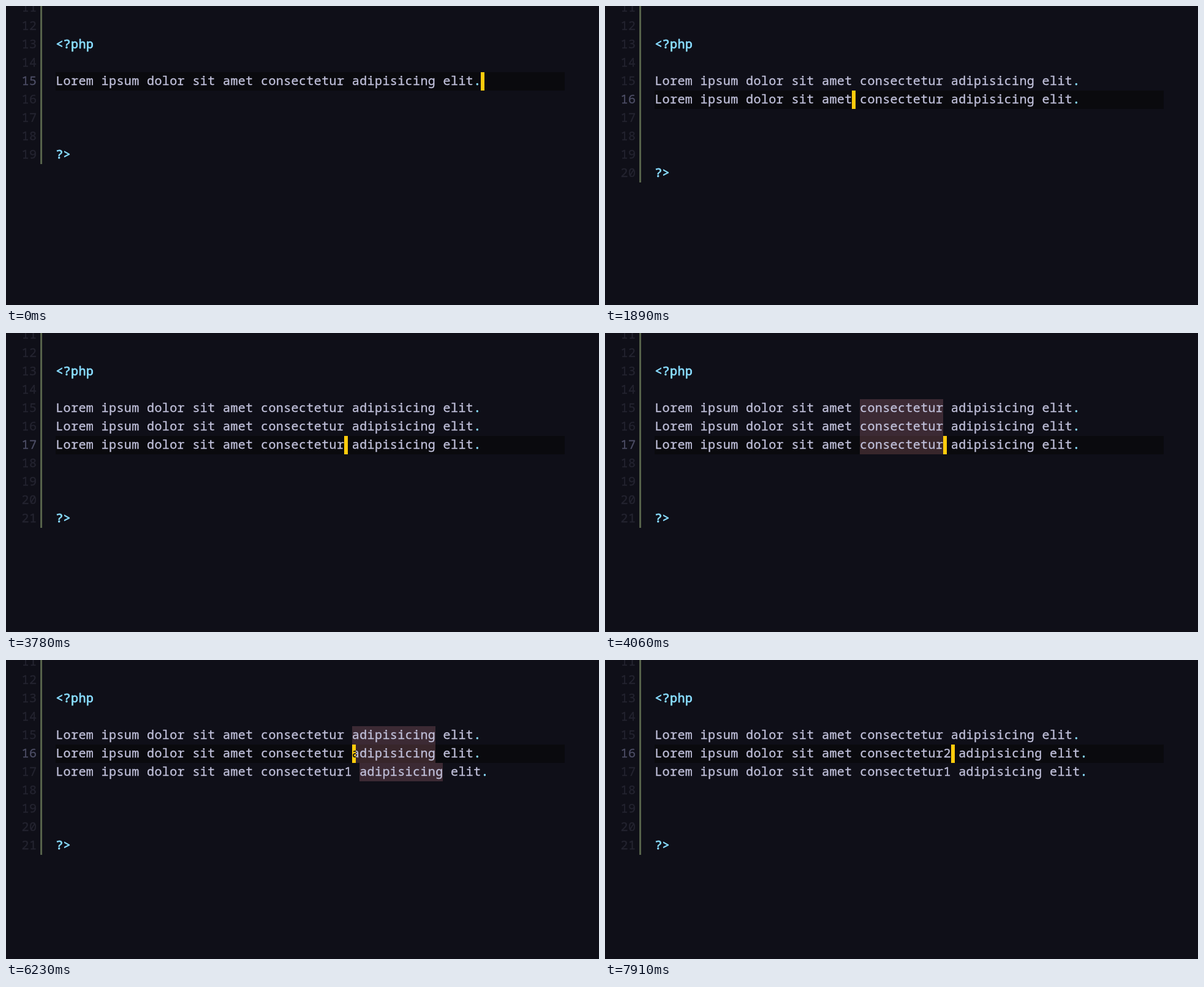
An HTML page with a canvas for the animation above (8000 ms loop, 968x488 px).

```html
<!DOCTYPE html>
<html lang="en">
<head>
<meta charset="utf-8">
<title>Editor word highlight</title>
<style>
  html, body { margin: 0; width: 100%; height: 100%; overflow: hidden; background: #0f0f18; }
  canvas { display: block; }
</style>
</head>
<body>
<canvas id="stage" width="968" height="488"></canvas>
<script>
const ctx = document.getElementById('stage').getContext('2d');
const LOOP = 8000, LEFT = 81, STEP = 12.4, ROW = 30, FIRST = 15;
const COLORS = {
  back: '#0f0f18', line: '#0a0a0e', text: '#c0c0da', tag: '#89ddff',
  number: '#242430', active: '#4d4e66', bar: '#56624a',
  match: 'rgba(255, 160, 170, .19)', cursor: '#ffcb0c'
};

// Each state: start time, cursor line, cursor column, highlighted word
const states = [
  [0, 15, 56], [140, 18, 0],
  [700, 15, 26], [980, 15, 26, 'amet'],
  [1890, 16, 26], [2660, 17, 26],
  [3780, 17, 38], [4060, 17, 38, 'consectetur'],
  [5320, 17, 39],
  [5950, 16, 39], [6230, 16, 39, 'adipisicing'],
  [6720, 16, 38], [7000, 16, 38, 'consectetur'],
  [7140, 16, 39]
];

const rowTop = n => 108 + (n - FIRST) * ROW;
const colX = c => Math.round(LEFT + c * STEP);
const sentence = (suffix = '') => `Lorem ipsum dolor sit amet consectetur${suffix} adipisicing elit.`;

function box(color, x, y, w, h) {
  ctx.fillStyle = color;
  ctx.fillRect(x, y, w, h);
}

// A thin outline gives the letters their weight; tags and full stops are heavier
function write(text, x, line, color) {
  ctx.font = '20px "Noto Sans Mono", "DejaVu Sans Mono", monospace';
  ctx.lineJoin = 'round';
  [...text].forEach((char, i) => {
    const ink = char === '.' ? COLORS.tag : color;
    const at = [char, x + i * STEP + .2, rowTop(line) + 21];
    ctx.fillStyle = ctx.strokeStyle = ink;
    ctx.lineWidth = ink === COLORS.tag ? .8 : .35;
    ctx.fillText(...at);
    ctx.strokeText(...at);
  });
}

function linesAt(t) {
  const lines = [sentence()];
  if (t >= 1890) lines.push(sentence(t >= 7140 ? '2' : ''));
  if (t >= 2660) lines.push(sentence(t >= 5320 ? '1' : ''));
  return lines;
}

function draw(t) {
  const [, line, col, word] = states.findLast(s => s[0] <= t);
  const lines = linesAt(t), last = 18 + lines.length;
  const x = colX(col), y = rowTop(line);

  box(COLORS.back, 0, 0, 968, 488);
  box(COLORS.line, LEFT, y, 831, ROW);
  box(COLORS.bar, 56, 0, 3, rowTop(last) + ROW);

  for (let n = 11; n <= last; n++) {
    write(String(n), 25.4, n, n === line ? COLORS.active : COLORS.number);
  }
  write('<?php', LEFT, 13, COLORS.tag);
  write('?>', LEFT, last, COLORS.tag);

  lines.forEach((text, i) => {
    const match = word && text.match(new RegExp(`\\b${word}\\b`));
    if (match) {
      const from = colX(match.index);
      box(COLORS.match, from, rowTop(FIRST + i), colX(match.index + word.length) - from, ROW);
    }
    write(text, LEFT, FIRST + i, COLORS.text);
  });

  // The letter under the cursor shows dark
  box(COLORS.cursor, x, y, 6, ROW);
  const under = (lines[line - FIRST] || '')[col];
  if (under) {
    ctx.save();
    ctx.beginPath();
    ctx.rect(x, y, 6, ROW);
    ctx.clip();
    write(under, LEFT + col * STEP, line, COLORS.back);
    ctx.restore();
  }
}

const start = performance.now();
function tick() {
  draw((performance.now() - start) % LOOP);
  requestAnimationFrame(tick);
}
tick();
</script>
</body>
</html>
```
